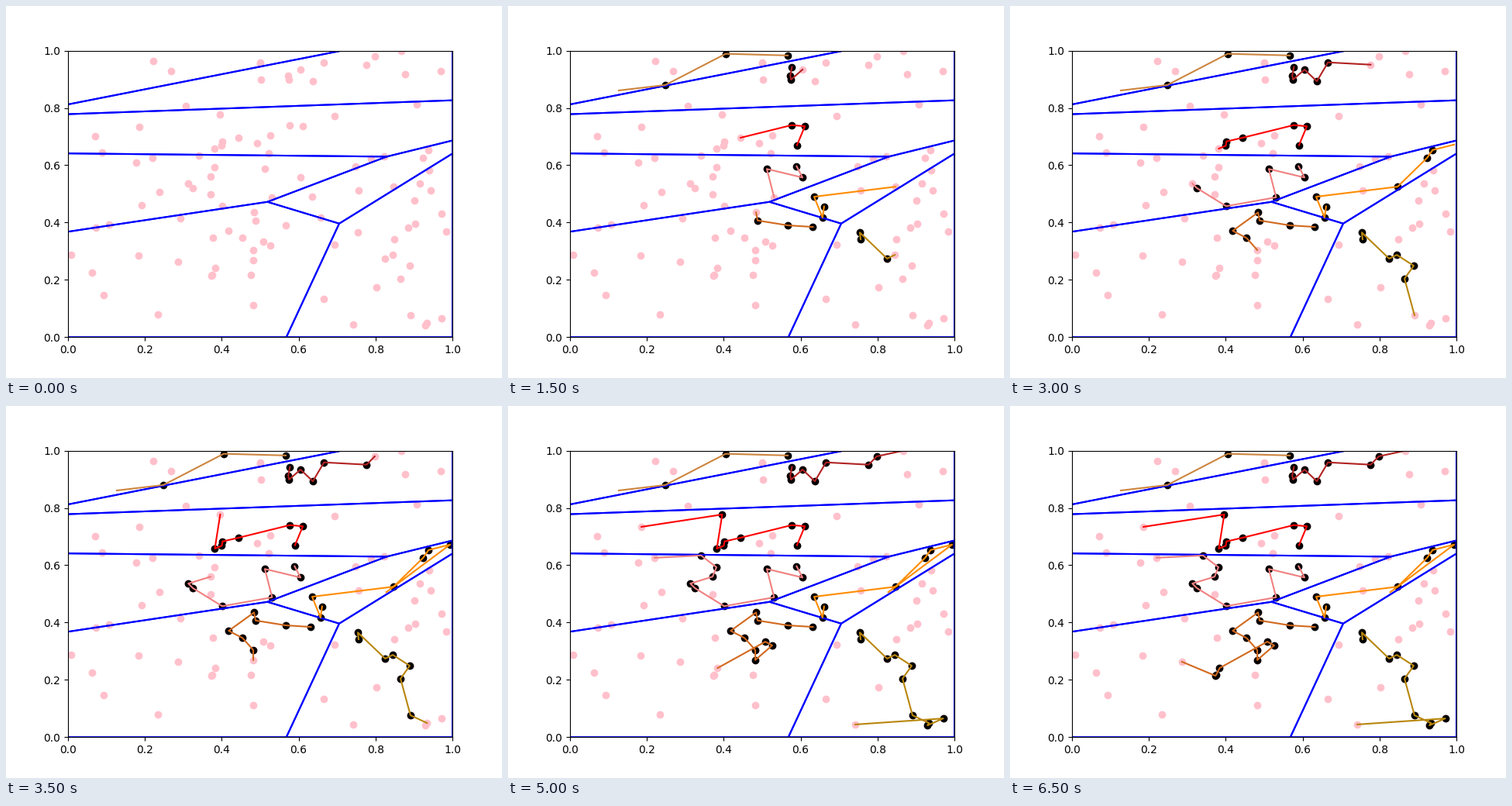
Recreate the animation shown at these times as a matplotlib script. Size 640 px wide and 480 px high, loop 7.5 s.

```python
import numpy as np
import matplotlib.pyplot as plt
from matplotlib.animation import FuncAnimation

STEPS, STEP_MS = 15, 500
SAMPLES = 100
CLEARANCE = 0.045

# Key points of each walk; the first one is the site of its Voronoi cell
WALKS = {
    "peru": [(.5667, .9832), (.405, .989), (.248, .880), (.127, .861)],
    "firebrick": [(.5773, .943), (.573, .913), (.575, .899), (.605, .934),
                  (.637, .893), (.666, .959), (.777, .951), (.798, .980),
                  (.867, 1.0)],
    "red": [(.5905, .670), (.611, .736), (.577, .740), (.444, .696),
            (.402, .683), (.400, .668), (.382, .658), (.396, .777),
            (.186, .734)],
    "lightcoral": [(.5895, .5964), (.605, .557), (.512, .587), (.531, .488),
                   (.401, .457), (.325, .520), (.313, .536), (.371, .560),
                   (.381, .593), (.341, .634), (.220, .626)],
    "darkorange": [(.661, .456), (.657, .417), (.635, .490), (.847, .525),
                   (.924, .626), (.938, .653), (.994, .672), (.828, .506)],
    "chocolate": [(.632, .3845), (.567, .390), (.488, .407), (.484, .435),
                  (.418, .371), (.454, .346), (.482, .304), (.482, .269),
                  (.526, .320), (.508, .333), (.384, .241), (.375, .217),
                  (.373, .214), (.286, .263)],
    "darkgoldenrod": [(.756, .3415), (.754, .365), (.825, .274), (.845, .287),
                      (.889, .249), (.865, .204), (.891, .076), (.934, .049),
                      (.930, .041), (.971, .065), (.742, .044)],
}

# Index from which a walk leaves the pink samples
STRAYS_AT = {"peru": 1, "darkorange": 6}


def clip(poly, site, other):
    """Keep the part of a polygon that lies nearer to site than to other."""
    side = (poly - (site + other) / 2) @ (other - site)
    kept = []
    for p, q, a, b in zip(poly, np.roll(poly, -1, 0), side, np.roll(side, -1)):
        if a <= 0:
            kept.append(p)
        if a * b < 0:
            kept.append(p + (q - p) * a / (a - b))
    return np.array(kept)


def voronoi_cell(site, sites):
    cell = np.array([(0, 0), (1, 0), (1, 1), (0, 1)], float)
    for other in sites:
        if other is not site:
            cell = clip(cell, site, other)
    return cell


def sample_points():
    """Walk stops, filled up with random points that keep clear of the walks."""
    points = [p for color, walk in WALKS.items()
              for p in walk[1:STRAYS_AT.get(color)]]
    stops = np.concatenate(list(WALKS.values()))
    rng = np.random.default_rng(4)
    while len(points) < SAMPLES:
        p = rng.random(2)
        if np.hypot(*(stops - p).T).min() > CLEARANCE:
            points.append(p)
    return np.array(points)


fig, ax = plt.subplots(figsize=(6.4, 4.8), dpi=100)
ax.set_xlim(0, 1)
ax.set_ylim(0, 1)

ax.scatter(*sample_points().T, color="pink")
visited = ax.scatter([], [], color="black")
sites = [np.array(walk[0]) for walk in WALKS.values()]
for site in sites:
    cell = voronoi_cell(site, sites)
    ax.plot(*np.vstack([cell, cell[:1]]).T, color="blue")
trails = [ax.plot([], [], color=color)[0] for color in WALKS]


def update(step):
    dots = []
    for trail, walk in zip(trails, WALKS.values()):
        trail.set_data(*zip(*walk[:step + 1]))
        dots += walk[:min(step, len(walk) - 1)]
    visited.set_offsets(np.array(dots).reshape(-1, 2))
    return [visited, *trails]


anim = FuncAnimation(fig, update, frames=STEPS, interval=STEP_MS, repeat=True)
plt.show()
```
